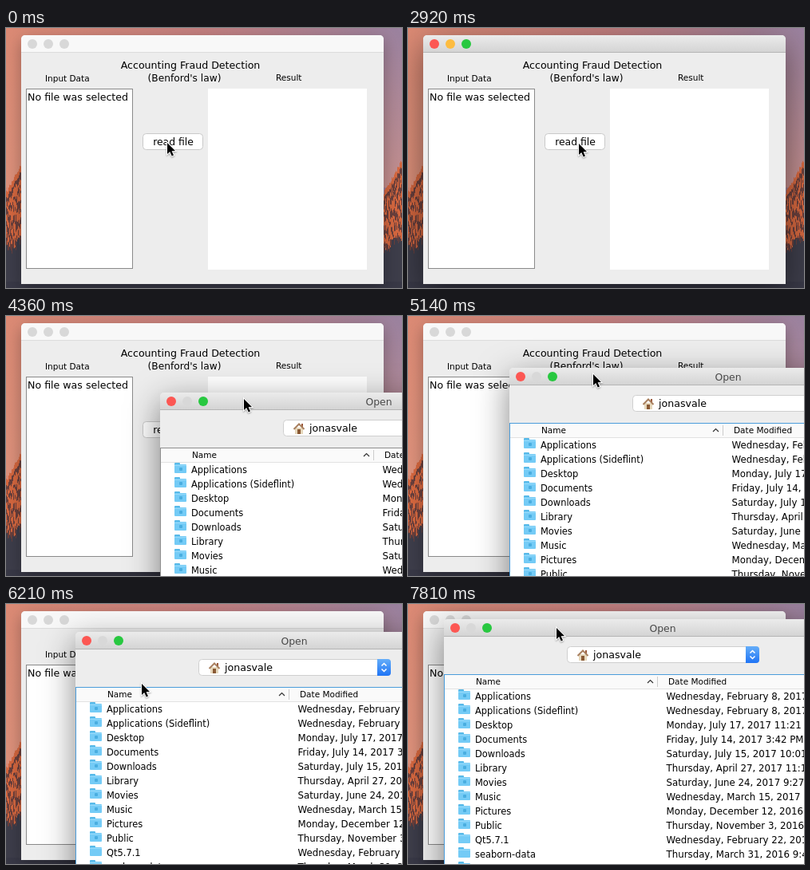
Recreate the animation shown at these times as an HTML page with a canvas. Size 496 by 326 pixels, loop 8000 ms.

```html
<!DOCTYPE html>
<html lang="en">
<head>
<meta charset="utf-8">
<title>File chooser demo</title>
<style>
html, body { margin: 0; width: 100%; height: 100%; overflow: hidden; }
canvas { display: block; }
</style>
</head>
<body>
<canvas id="stage" width="496" height="326"></canvas>
<script>
const ctx = document.getElementById('stage').getContext('2d');
const W = 496, H = 326, LOOP = 8000;
const DIALOG_W = 548, DIALOG_H = 400;
const ACTIVATE = 2920, PRESS = 2980, OPEN = 3130, OPENED = 3310, DRAG = 4930;

const RED = '#fc5753', YELLOW = '#fdbc40', GREEN = '#28c840', OFF = '#d8d8d8';

// Easings return the progress of x and y separately
const glide = k => Array(2).fill(k * k * (3 - 2 * k));
const fling = k => [1 - (1 - k) ** 3.4, 1 - (1 - k) ** 2.5];

const cursorMoves = [
  { from: 1050, to: 1350, end: [203, 184] },
  { from: 1530, to: 2210, end: [213, 144] },
  { from: 3970, to: 4360, end: [297, 103] },
  { from: DRAG, to: 5780, end: [191, 43], ease: fling },
  { from: 6100, to: 6900, end: [221, 60], bow: [-56, 130] },
  { from: 6930, to: 7080, end: [227, 45] },
  { from: 7470, to: 7810, end: [185, 29] }
];
const dialogMoves = [
  { from: DRAG, to: 5780, end: [87, 35], ease: fling },
  { from: 7470, to: 7810, end: [45, 19] }
];

const files = [
  ['Applications', 'Wednesday, February 8, 2017 9:12 AM'],
  ['Applications (Sideflint)', 'Wednesday, February 8, 2017 9:14 AM'],
  ['Desktop', 'Monday, July 17, 2017 11:21 AM'],
  ['Documents', 'Friday, July 14, 2017 3:42 PM'],
  ['Downloads', 'Saturday, July 15, 2017 10:01 AM'],
  ['Library', 'Thursday, April 27, 2017 11:10 AM'],
  ['Movies', 'Saturday, June 24, 2017 9:27 PM'],
  ['Music', 'Wednesday, March 15, 2017 8:30 PM'],
  ['Pictures', 'Monday, December 12, 2016 7:15 PM'],
  ['Public', 'Thursday, November 3, 2016 4:20 PM'],
  ['Qt5.7.1', 'Wednesday, February 22, 2017 1:05 PM'],
  ['seaborn-data', 'Thursday, March 31, 2016 9:40 AM'],
  ['workspace', 'Monday, May 1, 2017 2:18 PM']
];

function positionAt(start, moves, t) {
  let pos = start;
  for (const { from, to, end, ease = glide, bow = [0, 0] } of moves) {
    if (t < from) break;
    const k = Math.min(1, (t - from) / (to - from));
    const progress = ease(k), arc = Math.sin(Math.PI * k);
    pos = pos.map((p, i) => p + (end[i] - p) * progress[i] + bow[i] * arc);
  }
  return pos.map(Math.round);
}

function seededRandom(seed) {
  return () => (seed = seed * 16807 % 2147483647) / 2147483647;
}

function rect(x, y, w, h, color) {
  ctx.fillStyle = color;
  ctx.fillRect(x, y, w, h);
}

function rounded(x, y, w, h, radii, fill, stroke) {
  ctx.beginPath();
  ctx.roundRect(x, y, w, h, radii);
  ctx.fillStyle = fill;
  ctx.fill();
  if (stroke) {
    ctx.strokeStyle = stroke;
    ctx.lineWidth = 1;
    ctx.stroke();
  }
}

function polyline(points, color, width) {
  ctx.beginPath();
  points.forEach(([x, y]) => ctx.lineTo(x, y));
  ctx.strokeStyle = color;
  ctx.lineWidth = width;
  ctx.stroke();
}

// A chevron pointing up for positive rise, down for negative
function chevron(x, y, half, rise, color, width) {
  polyline([[x - half, y], [x, y - rise], [x + half, y]], color, width);
}

function text(str, x, y, size, color = '#000', align = 'left') {
  ctx.font = `${size}px "DejaVu Sans", sans-serif`;
  ctx.textAlign = align;
  ctx.fillStyle = color;
  ctx.fillText(str, x, y);
}

function gradient(x0, y0, x1, y1, ...colors) {
  const g = ctx.createLinearGradient(x0, y0, x1, y1);
  colors.forEach((c, i) => g.addColorStop(i / (colors.length - 1), c));
  return g;
}

// Rocky slope rising to the right, with dark clefts and slate at its foot
function mountain(left, width, low, high, seed) {
  const random = seededRandom(seed);
  for (let x = 0; x < width; x++) {
    const top = low + (high - low) * x / width + random() * 5;
    rect(left + x, top, 1, H - top, '#d5673f');
    const foot = 266 + 8 * Math.sin(x / 4) + random() * 6;
    rect(left + x, foot, 1, H - foot, '#3d3d4a');
    for (let y = top + 8; y < foot; y += 10 + random() * 14) {
      rect(left + x, y, 1.5, 3 + random() * 9, '#693f3c');
    }
  }
}

function wallpaper() {
  rect(0, 0, W, H, gradient(0, 0, W, 0, '#dc8a74', '#c48080', '#9a82a0'));
  rect(0, 0, W, 200, gradient(0, 0, 0, 200, 'rgba(222,150,128,0)', 'rgba(222,150,128,.6)'));
  mountain(0, 24, 204, 158, 7);
  mountain(470, 26, 210, 163, 19);
  rect(0, 318, W, 8, '#383846');
}

function windowFrame(x, y, w, h, bar, active) {
  ctx.save();
  ctx.shadowColor = active ? 'rgba(0,0,0,.48)' : 'rgba(0,0,0,.3)';
  ctx.shadowBlur = active ? 40 : 20;
  ctx.shadowOffsetY = active ? 12 : 6;
  rounded(x, y, w, h, [5, 5, 0, 0], '#ededed');
  ctx.restore();
  const fill = active ? gradient(0, y, 0, y + bar, '#ebebeb', '#d3d3d3') : '#f8f8f8';
  rounded(x, y, w, bar, [5, 5, 0, 0], fill);
  rect(x, y + bar - 1, w, 1, active ? '#b5b5b5' : '#dcdcdc');
}

function lights(x, y, ...colors) {
  colors.forEach((color, i) => {
    ctx.beginPath();
    ctx.arc(x + i * 20, y, 6, 0, Math.PI * 2);
    ctx.fillStyle = color;
    ctx.fill();
  });
}

function mainWindow(t) {
  const active = t >= ACTIVATE && t < OPEN;
  const pressed = t >= PRESS && t < OPEN;
  windowFrame(19, 9, 454, 312, 22, active);
  lights(33, 20, ...(active ? [RED, YELLOW, GREEN] : [OFF, OFF, OFF]));

  text('Accounting Fraud Detection', 231, 51, 12.6, '#000', 'center');
  text("(Benford's law)", 223.5, 67, 12.2, '#000', 'center');
  text('Input Data', 49, 67, 10.5);
  text('Result', 338, 66, 10.5);

  rect(25, 76, 134, 226, '#8a8a8a');
  rect(26, 77, 132, 224, '#fff');
  text('No file was selected', 27, 91, 12.6);
  rect(253, 76, 199, 227, '#fff');

  const face = pressed ? gradient(0, 132, 0, 153, '#68aef8', '#1a6ef0') : '#fff';
  rounded(171.5, 132.5, 75, 20, 4, face, pressed ? '#3a78d8' : '#c9c9c9');
  text('read file', 209.5, 147, 12.4, pressed ? '#fff' : '#000', 'center');
}

function folder(x, y, marked) {
  rounded(x, y, 7, 4, 1, '#57b9e8');
  rounded(x, y + 2, 15, 11, 1, '#74cbf6');
  rect(x, y + 3, 15, 1, '#97dafa');
  if (marked) rounded(x + 6, y + 6, 4, 4, 1, '#4aaee0');
}

function house(x, y) {
  rect(x + 10, y + 1, 2, 5, '#9b5a3c');
  rect(x + 2, y + 6, 10, 8, '#e6d8bc');
  rect(x + 5, y + 8, 4, 6, '#8a5a35');
  chevron(x + 7, y + 8, 6.5, 6.5, '#a9805f', 2);
}

function dialog(t) {
  const focused = t >= DRAG;
  windowFrame(0, 0, DIALOG_W, DIALOG_H, 22, true);
  lights(14, 11, RED, OFF, GREEN);
  text('Open', DIALOG_W / 2, 16, 12.4, '#484848', 'center');

  rounded(154.5, 34.5, 240, 20, 4, '#fff', '#cfcfcf');
  rounded(378, 34, 17, 21, [0, 4, 4, 0], gradient(0, 34, 0, 55, '#65aef9', '#1f74f5'));
  chevron(386.5, 42.5, 3, 3, '#fff', 1.5);
  chevron(386.5, 46.5, 3, -3, '#fff', 1.5);
  house(167, 38);
  text('jonasvale', 187, 49, 12.6);

  rect(0, 69, DIALOG_W, DIALOG_H - 69, focused ? '#4b9ddb' : '#8f8f8f');
  rect(1, 70, DIALOG_W - 2, DIALOG_H - 71, '#fff');
  rect(1, 70, DIALOG_W - 2, 17, '#fafafa');
  rect(1, 87, DIALOG_W - 2, 1, '#e2e2e2');
  text('Name', 40, 82, 10.5);
  chevron(258.5, 80, 3.5, 3.5, '#333', 1.2);
  rect(267, 72, 1, 13, '#ccc');
  text('Date Modified', 281, 82, 10.5);

  files.forEach(([name, date], i) => {
    const y = 101 + i * 18;
    folder(18, y - 13, i < 10);
    text(name, 39, y, 11.45);
    text(date, 278.5, y, 11.8);
  });
}

function showDialog(t) {
  const [x, y] = positionAt([193, 96], dialogMoves, t);
  const k = Math.min(1, 0.25 + 0.75 * (t - OPEN) / (OPENED - OPEN));
  const scale = 0.9 + 0.1 * k;
  ctx.save();
  ctx.globalAlpha = k;
  ctx.translate(x + DIALOG_W / 2 * (1 - scale), y + DIALOG_H / 2 * (1 - scale));
  ctx.scale(scale, scale);
  dialog(t);
  ctx.restore();
}

const arrow = new Path2D('M0 0V14L3.2 11L5.7 16.4L8 15.4L5.6 10.2L10 10Z');

function cursor(t) {
  const [x, y] = positionAt([201, 143], cursorMoves, t);
  ctx.save();
  ctx.translate(x + 1, y + 1);
  ctx.shadowColor = 'rgba(0,0,0,.35)';
  ctx.shadowBlur = 2;
  ctx.shadowOffsetY = 1;
  ctx.strokeStyle = '#fff';
  ctx.lineWidth = 2;
  ctx.stroke(arrow);
  ctx.shadowColor = 'transparent';
  ctx.fillStyle = '#000';
  ctx.fill(arrow);
  ctx.restore();
}

function draw(t) {
  wallpaper();
  mainWindow(t);
  if (t >= OPEN) showDialog(t);
  cursor(t);
}

const start = performance.now();
function tick() {
  draw((performance.now() - start) % LOOP);
  requestAnimationFrame(tick);
}
tick();
</script>
</body>
</html>
```
